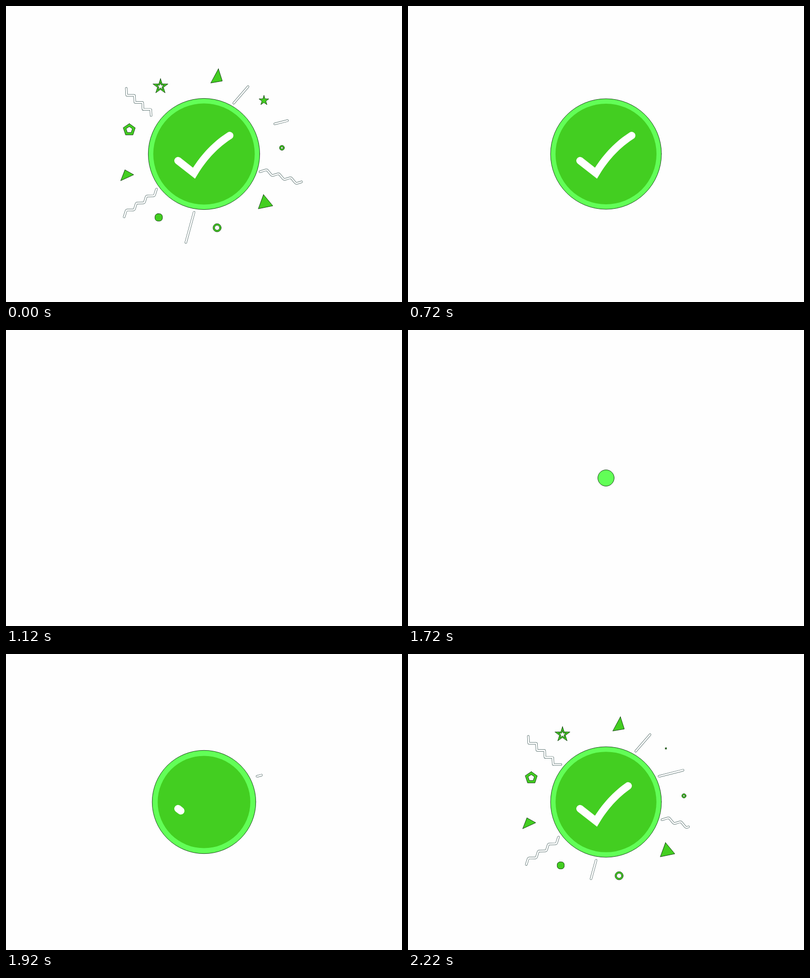
Animation, 800 px wide and 600 px high, one loop 2.24 s. Source, as an HTML page with a canvas:

```html
<!DOCTYPE html>
<html lang="en">
<head>
<meta charset="utf-8">
<title>Success check</title>
<style>
html, body { margin: 0; width: 100%; height: 100%; overflow: hidden; background: #fefefe; }
canvas { display: block; }
</style>
</head>
<body>
<canvas id="stage" width="800" height="600"></canvas>
<script>
const ctx = document.getElementById('stage').getContext('2d');
const LOOP = 2240, TICK = 20, EXIT = 1380, END = 1680;
const GREEN = '#43ce21', LIGHT = '#62ff57', EDGE = '#0c360c', LINE_EDGE = '#3f5a58', PAPER = '#fefefe';

const progress = (time, from, to) => Math.min(1, Math.max(0, (time - from) / (to - from)));
const easeOut = p => 1 - (1 - p) ** 2;

// A fast pop followed by a slow settle, then a cubic collapse.
function discRadius(time, full, pop, decay) {
  const grown = full - pop * Math.exp(-time / decay) - 18.4 * Math.exp(-time / 200);
  const settle = 1 - 0.013 * progress(time, 600, 1280);
  return Math.max(0, grown * settle * (1 - progress(time, EXIT, END) ** 3));
}

function polygon(radii, sides) {
  return Array.from({ length: sides }, (_, i) => {
    const angle = -Math.PI / 2 + i * 2 * Math.PI / sides;
    const r = radii[i % radii.length];
    return [r * Math.cos(angle), r * Math.sin(angle)];
  });
}
const star = r => polygon([r, r * 0.39], 10);
const pentagon = r => polygon([r], 5);

function addPoints(points) {
  points.forEach(([x, y]) => ctx.lineTo(x, y));
  ctx.closePath();
}
function addCircle(r) {
  ctx.moveTo(r, 0);
  ctx.arc(0, 0, r, 0, 2 * Math.PI);
}
const shape = points => () => addPoints(points);
const hollow = (outline, outer, inner) => () => {
  for (const r of [outer, inner]) {
    const points = outline(r);
    ctx.moveTo(...points[0]);
    addPoints(points);
  }
};
const ring = (outer, inner) => () => { addCircle(outer); addCircle(inner); };

// Confetti: every piece pops in at its start time and lives equally long.
const POP = 100, LIFE = 700;
const pieces = [
  { x: 425, y: 146, start: 252, path: shape([[4, -19], [12, 6], [-11, 10]]) },
  { x: 426.5, y: 449.5, start: 252, path: ring(8.3, 5) },
  { x: 312, y: 163, start: 325, path: hollow(star, 16, 8) },
  { x: 523, y: 400, start: 340, path: shape([[-3, -18], [16, 5], [-13, 11]]) },
  { x: 249, y: 251, start: 360, path: hollow(pentagon, 12.7, 6.7) },
  { x: 243, y: 343, start: 400, path: shape([[-3, -11], [15, -1], [-11, 11]]) },
  { x: 308.5, y: 428.5, start: 405, path: () => ctx.roundRect(-7.5, -7.5, 15, 15, 6) },
  { x: 557.5, y: 287.5, start: 412, path: ring(5, 2.2) },
  { x: 521, y: 191.5, start: 480, path: shape(star(10.5)) }
];

// Alternates two strides, giving a staircase or a wave.
function zigzag(x, y, strides, count) {
  const points = [[x, y]];
  for (let i = 0; i < count; i++) {
    const [dx, dy] = strides[i % 2];
    points.push([x += dx, y += dy]);
  }
  return points;
}

// Streaks: the head runs outward, the tail follows.
const streaks = [
  { points: [[460, 197], [489, 163.5]], head: [330, 480], tail: [620, 800] },
  { points: [[507, 248], [574, 231]], head: [130, 640], tail: [520, 670] },
  { points: [[380, 418], [362, 484]], head: [340, 620], tail: [620, 840] },
  { points: zigzag(309, 224, [[-15.7, 0], [-0.8, -14.3]], 8), bend: 1, head: [300, 500], tail: [560, 840] },
  { points: zigzag(513, 336, [[14, -4.4], [10.3, 12.4]], 7), bend: 4, head: [320, 620], tail: [620, 860] },
  { points: zigzag(304, 371, [[-4.4, 13.9], [-15.9, 0.3]], 7), bend: 3, head: [320, 510], tail: [620, 860] }
];

const CORNER = [379.8, 338.8], BEND = [409, 290], TIP = [452, 262.5];
const bezier = (i, s) => (1 - s) ** 2 * CORNER[i] + 2 * s * (1 - s) * BEND[i] + s * s * TIP[i];
const checkMark = [[347.5, 313.5]];
for (let i = 0; i <= 24; i++) checkMark.push([bezier(0, i / 24), bezier(1, i / 24)]);

function strokePart(points, from, to, styles, bend = 0) {
  if (to - from < 0.002) return;
  let length = 0;
  ctx.beginPath();
  ctx.moveTo(...points[0]);
  for (let i = 1; i < points.length; i++) {
    const [x, y] = points[i], next = points[i + 1];
    length += Math.hypot(x - points[i - 1][0], y - points[i - 1][1]);
    if (bend && next) ctx.arcTo(x, y, ...next, bend);
    else ctx.lineTo(x, y);
  }
  ctx.lineCap = 'round';
  ctx.setLineDash([length * (to - from), length * 2]);
  ctx.lineDashOffset = -length * from;
  for (const [color, width] of styles) {
    ctx.strokeStyle = color;
    ctx.lineWidth = width;
    ctx.stroke();
  }
  ctx.setLineDash([]);
}

function outline() {
  ctx.strokeStyle = EDGE;
  ctx.lineWidth = 0.9;
  ctx.stroke();
}

function drawDisc(radius, color) {
  ctx.beginPath();
  ctx.arc(400, 300, radius, 0, 2 * Math.PI);
  ctx.fillStyle = color;
  ctx.fill();
}

function drawPiece({ x, y, start, path }, time) {
  const leave = start + LIFE;
  const scale = progress(time, start, start + POP) - progress(time, leave, leave + POP);
  if (scale < 0.01) return;
  ctx.save();
  ctx.translate(x, y);
  ctx.scale(scale, scale);
  ctx.beginPath();
  path();
  ctx.restore();
  ctx.fillStyle = GREEN;
  ctx.fill('evenodd');
  outline();
}

function draw(time) {
  ctx.fillStyle = PAPER;
  ctx.fillRect(0, 0, 800, 600);
  if (time >= END) return;
  ctx.lineJoin = 'round';
  for (const { points, bend, head, tail } of streaks) {
    strokePart(points, progress(time, ...tail), progress(time, ...head), [[LINE_EDGE, 4.6], [PAPER, 3.2]], bend);
  }
  ctx.lineJoin = 'miter';
  for (const piece of pieces) drawPiece(piece, time);
  drawDisc(discRadius(time, 113.5, 78.6, 55), LIGHT);
  outline();
  drawDisc(discRadius(time, 103.4, 85, 60), GREEN);
  const drawn = easeOut(progress(time, 190, 600)) - progress(time, EXIT, EXIT + 200);
  strokePart(checkMark, 0, drawn, [['#fff', 15]]);
}

// The loop opens on the full burst; the entrance plays at its end.
function sceneTime(clock) {
  if (clock >= 1720) return clock - 1720;
  return clock < 60 ? 600 : clock + 560;
}

const start = performance.now();
function frame() {
  const clock = (performance.now() - start) % LOOP;
  draw(sceneTime(Math.floor(clock / TICK) * TICK));
  requestAnimationFrame(frame);
}
frame();
</script>
</body>
</html>
```
